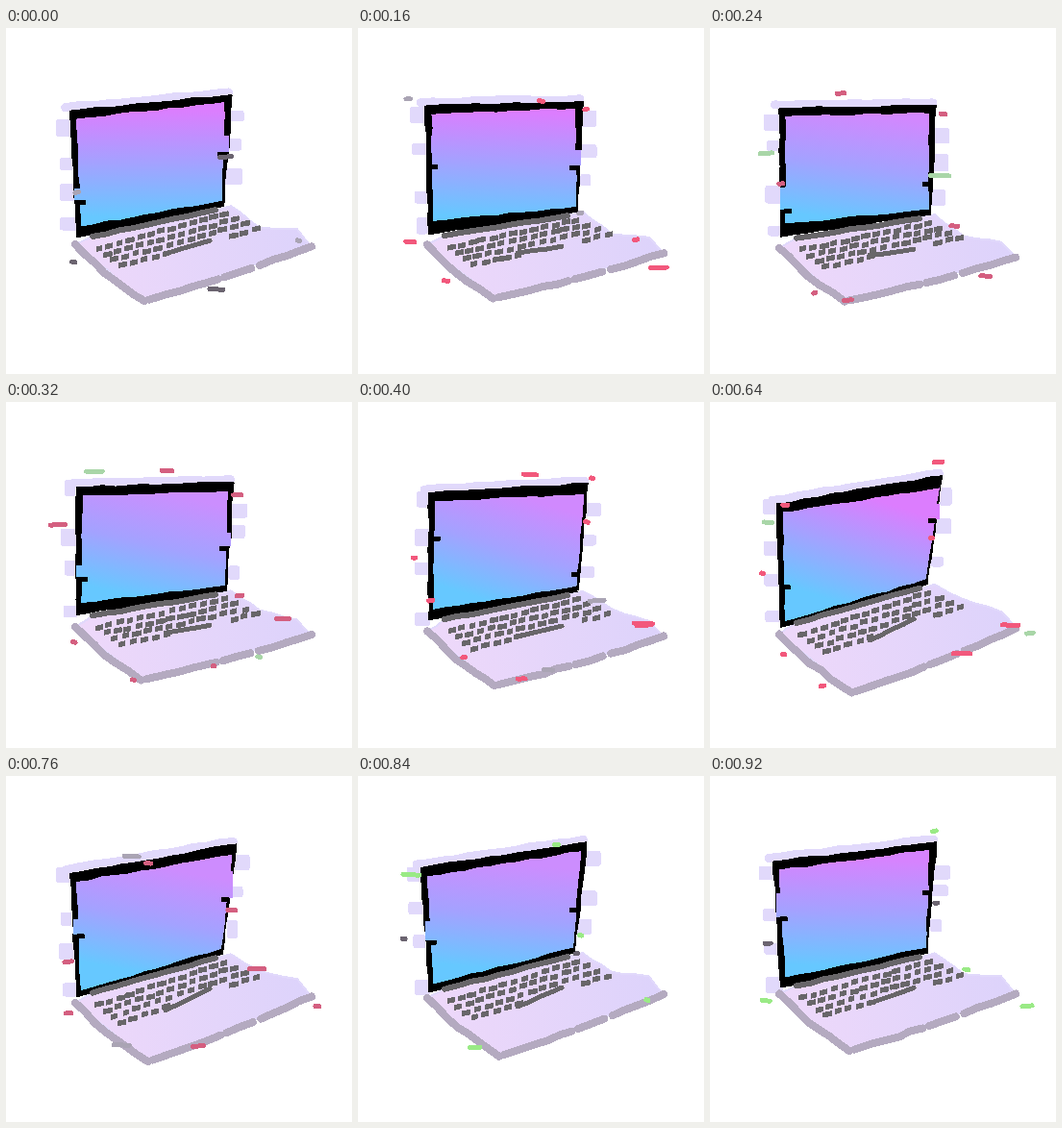
Animation, 360 px wide and 360 px high, one loop 0.96 s. Source, as an HTML page:

```html
<!DOCTYPE html>
<html lang="en">
<head>
<meta charset="utf-8">
<title>Sketched laptop</title>
<style>
html, body { margin: 0; width: 100%; height: 100%; overflow: hidden; background: #fff; }
svg { display: block; width: 100vw; height: 100vh; }
path { stroke-linejoin: round; stroke-linecap: round; fill: none; }
</style>
</head>
<body>
<svg id="stage" viewBox="0 0 360 360" shape-rendering="crispEdges">
  <defs>
    <linearGradient id="glow" gradientUnits="userSpaceOnUse">
      <stop id="top" offset="0"/>
      <stop offset=".5" stop-color="#a3a2ff"/>
      <stop offset="1" stop-color="#66c8ff"/>
    </linearGradient>
    <linearGradient id="plate" gradientUnits="userSpaceOnUse" x1="90" y1="240" x2="310" y2="230">
      <stop offset="0" stop-color="#edd8fa"/>
      <stop offset="1" stop-color="#ddd3fb"/>
    </linearGradient>
  </defs>
</svg>
<script>
const STEP = 40, COUNT = 24;
const INK = '#686669', EDGE = '#b4aac0', HAZE = '#e1d9fb';
const PINK = '#f2587c', ROSE = '#d45f80', SAGE = '#a9d6a8', LIME = '#9aea86',
      SLATE = '#6b6470', FOG = '#aaa4b4';

// Main and accent dash colours through the loop
const TINTS = [[SLATE, FOG], [PINK, FOG], [ROSE, SAGE], [PINK, FOG],
               [PINK, SAGE], [ROSE, FOG], [LIME, SLATE]];

const stage = document.getElementById('stage');
const glow = document.getElementById('glow');
const topStop = document.getElementById('top');

function layer(stroke, width = 0, fill = 'none') {
  const el = document.createElementNS('http://www.w3.org/2000/svg', 'path');
  el.setAttribute('stroke', stroke);
  el.setAttribute('stroke-width', width);
  el.style.fill = fill;
  stage.append(el);
  return (d, color) => {
    el.setAttribute('d', d);
    if (color) el.setAttribute('stroke', color);
  };
}

const paint = {
  haze: layer(HAZE, 5, HAZE),
  strip: layer(HAZE, 9),
  base: layer(HAZE, 2, 'url(#plate)'),
  rim: layer(EDGE, 8),
  lid: layer('#000', 2, '#000'),
  screen: layer('none', 0, 'url(#glow)'),
  gaps: layer('none', 0, 'url(#glow)'),
  nicks: layer('#000', 1, '#000'),
  hinge: layer(INK, 6),
  keys: layer(INK, 1, INK),
  bar: layer(INK, 5),
  accents: layer(FOG, 5),
  dashes: layer(PINK, 5)
};

function random(seed) {
  let s = seed * 7919 + 17;
  const next = () => (s = (s * 16807 + 11) % 2147483647) / 2147483647;
  next();
  next();
  return next;
}

const mix = (a, b, k) => Array.isArray(a) ? a.map((v, i) => mix(v, b[i], k)) : a + (b - a) * k;
const shift = ([x, y], dx, dy) => [x + dx, y + dy];
const toPath = pts => 'M' + pts.map(p => p.map(v => v.toFixed(1)).join(' ')).join('L');
const repeat = (n, make) => Array.from({ length: n }, (_, i) => make(i)).join('');

const box = (x, y, w, h, lean = 0) => toPath([
  [x - w / 2, y - h / 2 + lean], [x + w / 2, y - h / 2 - lean],
  [x + w / 2, y + h / 2 - lean], [x - w / 2, y + h / 2 + lean]]) + 'Z';

// Hand-drawn line through the given points
function rough(pts, rnd, amount = 1) {
  const out = [pts[0]];
  for (let i = 1; i < pts.length; i++) {
    const a = pts[i - 1], b = pts[i];
    const n = Math.max(1, Math.round(Math.hypot(b[0] - a[0], b[1] - a[1]) / 14));
    for (let j = 1; j <= n; j++) {
      const wobble = j < n ? amount : 0;
      out.push(mix(a, b, j / n).map(v => v + (rnd() * 2 - 1) * wobble));
    }
  }
  return toPath(out);
}

const closed = (pts, rnd) => rough([...pts, pts[0]], rnd) + 'Z';

// Each corner sways around its rest place and peaks at its own phase
function posture(p) {
  const sway = (rest, reach, peak) => rest + reach * Math.cos(2 * Math.PI * (p - peak));
  const tl = [sway(70, 4, .4), sway(94, 12.5, .65)];
  const tr = [sway(237.5, 4, .62), sway(77, 8, .42)];
  const br = [sway(227, 2, .3), sway(190, 6.5, .4)];
  const bl = [74, sway(224, 10, .63)];
  return {
    lid: [tl, tr, br, bl],
    screen: [shift(tl, 6, 8), shift(tr, sway(-5, 3, .6), sway(9.5, 3, .6)),
             shift(br, -1, -5), shift(bl, 4, sway(-9.5, 4, .7))],
    hinge: [[90, sway(223, 7.5, .6)], [218, sway(194.5, 6.5, .4)]],
    left: [72, sway(233.5, 9.5, .58)],
    front: [sway(144, 4, .75), sway(292, 11, .62)],
    right: [318, sway(235, 8.5, .43)],
    corner: [303, sway(218, 10, .42)],
    back: [264, sway(210, 7, .3)],
    tilt: sway(.2, .2, .55),
    pink: 214 + 11 * Math.cos(2 * Math.PI * (2 * p - .17))
  };
}

function keyboard([a, b], rnd) {
  let d = '';
  for (let row = 0; row < 4; row++) {
    const from = shift(a, 7 + row * 8, 12 + row * 6);
    const to = shift(b, 9 + row * 11, 5 + row * 5);
    for (let i = 0; i < 13; i++) {
      const [x, y] = mix(from, to, i / 12);
      const w = 5.5 + rnd() * 3.5, dx = rnd() * 2 - 1, dy = rnd() * 2 - 1;
      if (row < 3 || i < 5 || i > 9) d += box(x + dx, y + dy, w, 4.6, .8);
    }
  }
  return d;
}

// Breaks in the black frame, each with a dark nick at its end
function breaks(lid, screen, rnd) {
  let gaps = '', nicks = '';
  for (const [from, to, side] of [[0, 3, 1], [1, 2, -1]]) {
    const t = .25 + rnd() * .5, h = 12 + rnd() * 18;
    const [x, y] = mix(mix(lid[from], lid[to], t), mix(screen[from], screen[to], t), .5);
    if (rnd() < .6) gaps += box(x, y, 6, h);
    nicks += box(x + side * 5, y + h / 2 + 2, 7, 4);
  }
  paint.gaps(gaps);
  paint.nicks(nicks);
}

// Pale blots down both sides of the lid
const blots = (lid, rnd) => repeat(7, i => {
  const right = i % 2, t = (i + rnd()) / 7;
  const [x, y] = right ? mix(lid[1], lid[2], t) : mix(lid[0], lid[3], t);
  const w = 6 + rnd() * 10;
  return box(x + (right ? 7 : -7), y, w, 6 + rnd() * 8);
});

// Short marker strokes strewn around the outline
const scatter = (count, ring, rnd) => repeat(count, i => {
  const u = (i + rnd()) / count * ring.length, k = Math.floor(u);
  const [x, y] = mix(ring[k], ring[(k + 1) % ring.length], u - k);
  const far = .95 + rnd() * .25, half = 1 + 9 * rnd() ** 2, tip = rnd() - .5;
  const cx = 185 + (x - 185) * far, cy = 185 + (y - 185) * far;
  return toPath([[cx - half, cy + tip], [cx + half, cy - tip]]);
});

function draw(n) {
  const { lid, screen, hinge, left, front, right, corner, back, tilt, pink } = posture(n / COUNT);
  const rnd = random(n + 1);

  topStop.setAttribute('stop-color', `rgb(${Math.round(pink)},${Math.round(345 - pink)},254)`);
  const lean = tilt * 62;
  const axis = {
    x1: 152 + lean, y1: (screen[0][1] + screen[1][1]) / 2,
    x2: 152 - lean * .6, y2: (screen[2][1] + screen[3][1]) / 2 + 4
  };
  for (const key in axis) glow.setAttribute(key, axis[key]);

  paint.haze(blots(lid, rnd));
  paint.strip(rough([shift(lid[0], -5, -4), shift(lid[1], -3, -3)], rnd));
  paint.base(closed([left, hinge[0], shift(hinge[1], 16, -4), back, corner, right, front], rnd));

  const edge = f => shift(mix(front, right, f), 0, 10 * f * (1 - f));
  paint.rim(rough([left, shift(mix(left, front, .42), 0, 5), front], rnd)
    + rough([edge(.03), edge(.22), edge(.44)], rnd)
    + rough([edge(.48), edge(.64)], rnd)
    + rough([edge(.69), edge(.85), right], rnd));

  paint.lid(closed(lid, rnd));
  paint.screen(closed(screen, rnd));
  breaks(lid, screen, rnd);
  paint.hinge(rough(hinge, rnd, .7));
  paint.keys(keyboard(hinge, rnd));
  paint.bar(rough([shift(hinge[0], 76, 18), shift(hinge[1], -6, 32)], rnd, .5));

  const ring = [lid[0], lid[1], lid[2], right, front, left];
  const [main, accent] = TINTS[Math.round(n / 3.8)];
  paint.dashes(scatter(3 + Math.round(6 * Math.sin(Math.PI * n / COUNT)), ring, rnd), main);
  paint.accents(scatter(2, ring, rnd), accent);
}

let shown = -1;
function tick(now) {
  const n = Math.floor(now / STEP) % COUNT;
  if (n !== shown) draw(shown = n);
  requestAnimationFrame(tick);
}
draw(0);
requestAnimationFrame(tick);
</script>
</body>
</html>
```
